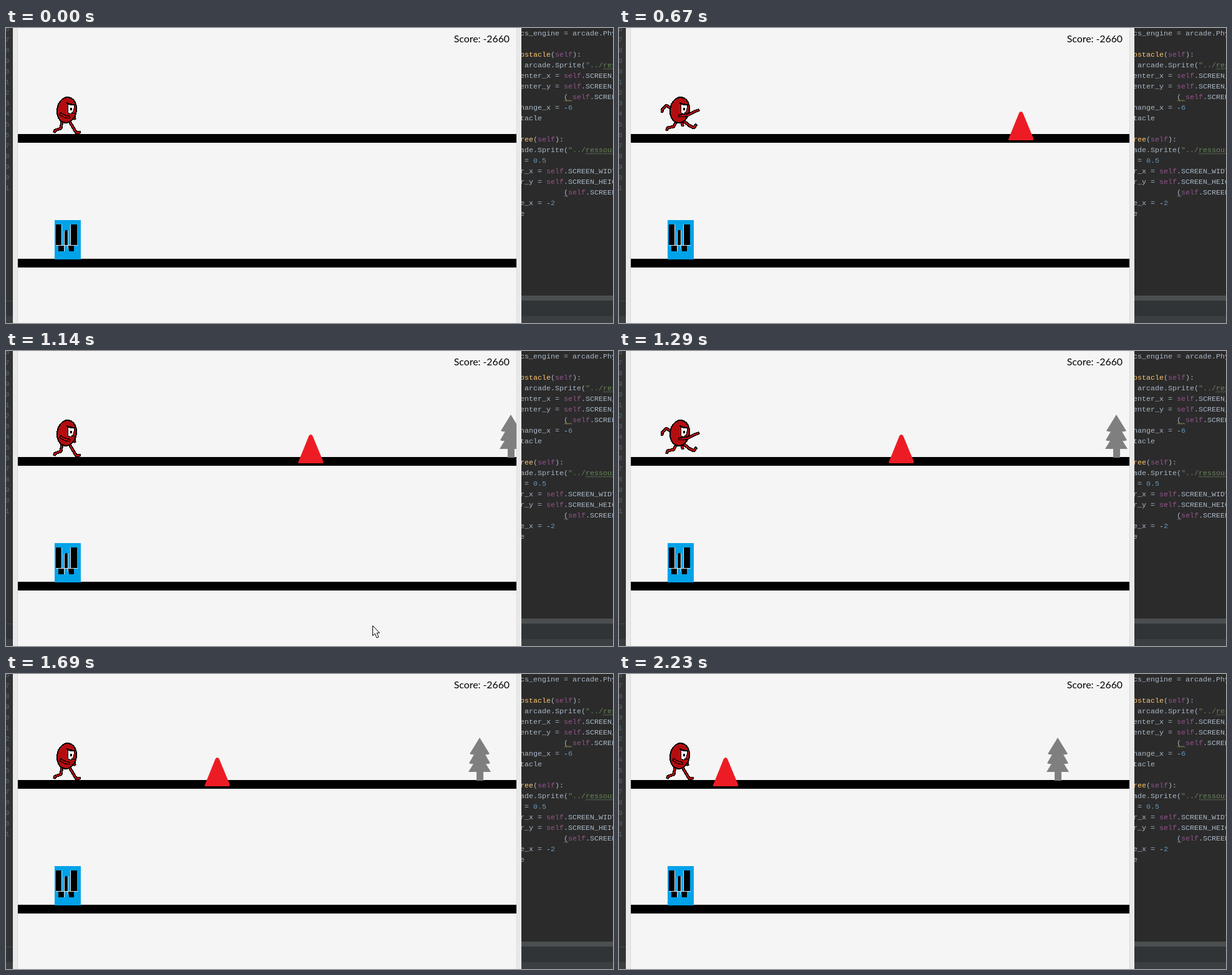
These frames come from a looping animation (974 by 473 pixels, 2.31 s). An HTML page:

```html
<!DOCTYPE html>
<html lang="en">
<head>
<meta charset="utf-8">
<title>Runner game</title>
<style>
html, body { margin: 0; width: 100%; height: 100%; overflow: hidden; background: #2b2b2b; }
svg { display: block; width: 100%; height: 100%; }
.code { font: 11.67px "Liberation Mono", "Courier New", monospace; fill: #a9b7c6; white-space: pre; }
.num { fill: #606366; }
.self { fill: #94558d; }
.str { fill: #6a8759; }
.fn { fill: #ffc66d; }
.lit { fill: #6897bb; }
.score { font: 15.8px Lato, Carlito, sans-serif; }
.pose { shape-rendering: crispEdges; }
.pose path { fill: none; stroke-linecap: round; stroke-linejoin: round; }
</style>
</head>
<body>
<svg viewBox="0 0 974 473" preserveAspectRatio="none">
  <defs><clipPath id="view"><path d="M19 0H819V473H19Z"/></clipPath></defs>

  <rect width="12" height="473" fill="#313335"/>
  <rect x="827" width="147" height="473" fill="#2b2b2b"/>
  <g id="code" class="code"></g>
  <g fill="none" stroke="#5d7350">
    <path id="wave1"/><path id="wave2"/>
    <path id="wave3" stroke="#a39a5c"/><path id="wave4" stroke="#8a8a8a"/>
  </g>
  <rect x="827" y="429" width="147" height="8" fill="#4c4f50"/>
  <rect y="437" width="974" height="25" fill="#313437"/>
  <rect y="437" width="11" height="1" fill="#46494b"/>
  <rect y="462" width="974" height="11" fill="#3c3f41"/>

  <rect x="11" width="816" height="473" fill="#e9e9e9"/>
  <path d="M18.5 0V473M819.5 0V473" stroke="#d8d8d8"/>
  <rect x="19" width="800" height="473" fill="#f5f5f5"/>
  <path d="M19 170H819V184H19ZM19 370H819V384H19Z"/>
  <text class="score" x="808" y="23.3" text-anchor="end">Score: -2660</text>

  <g shape-rendering="crispEdges">
    <rect x="78" y="308" width="42" height="63" fill="#00a2e8"/>
    <path fill="#dce8ee" d="M89 315H90V349H89ZM93 326H94V349H93ZM99 324H100V349H99ZM103 315H104V349H103ZM80 348H115V349H80ZM93 349H94V358H93ZM99 349H100V354H99Z"/>
    <path d="M80 315H89V348H80ZM94 326H95V324H99V348H94ZM104 315H114V348H104ZM84 349H93V358H84ZM100 349H109V358H101V354H100Z"/>
  </g>

  <g clip-path="url(#view)">
    <path id="tree" fill="#7f7f7f" d="M0 102L16 128Q12 130 9 129L17 143Q13 145 10 144L18 157H6V171H-5V157H-18L-10 144Q-13 145 -17 143L-9 129Q-12 130 -16 128Z"/>
    <path id="cone" fill="#ed1c24" d="M-20 178L-3 136Q0 132 3 136L20 177Q21 180 18 180H-18Q-21 180 -20 178Z"/>
    <g id="runner"></g>
    <path id="cursor" fill="#fff" stroke="#000" d="M.5 .5V16.5L4 13L7 20L10 18.5L7 12H11.5Z"/>
  </g>
</svg>
<script>
const $ = id => document.getElementById(id);
const LOOP = 2310;
const SHOTS = [0, 60, 140, 220, 290, 370, 450, 520, 600, 680, 760, 830, 910, 990, 1040,
  1140, 1220, 1290, 1370, 1450, 1520, 1590, 1690, 1760, 1840, 1910, 1990, 2070, 2140, 2230];
// [ms, game ticks]
const TICKS = [[0, -22], [370, 0], [910, 28], [1290, 44], [1690, 63], [1990, 78], [2230, 91]];
const MOUSE = [[910, 197], [1040, 320], [1140, 440]];

// Code lines: [y, text], where {class|text} colours a part.
const LINES = [
  [8, 'cs_engine = arcade.Physics'],
  [42, '{fn|bstacle}({self|self}):'],
  [59, ' arcade.Sprite({str|"../ress}'],
  [76, 'enter_x = {self|self}.SCREEN_W'],
  [93, 'enter_y = {self|self}.SCREEN_H'],
  [110, '          ( {self|self}.SCREEN'],
  [127, 'hange_x = -{lit|6}'],
  [144, 'tacle'],
  [178, '{fn|ree}({self|self}):'],
  [195, 'ade.Sprite({str|"../ressour}'],
  [212, ' = {lit|0.5}'],
  [229, 'r_x = {self|self}.SCREEN_WIDTH'],
  [246, 'r_y = {self|self}.SCREEN_HEIGH'],
  [263, '          ({self|self}.SCREEN_'],
  [280, 'e_x = -{lit|2}'],
  [297, 'e']
];
const paint = s => s.replace(/\{(\w+)\|([^}]*)\}/g, '<tspan class="$1">$2</tspan>');
let code = LINES.map(([y, s]) => `<text x="825" y="${y + 4}" xml:space="preserve">${paint(s)}</text>`).join('');
for (let i = 0; i < 16; i++)
  code += `<text class="num" x="-1.5" y="${5 + 17 * i}">${(6 + i) % 10}</text>`;
$('code').innerHTML = code;

function wave(id, x, y, end) {
  let d = `M${x} ${y}`;
  for (let i = 1; x + 2 * i <= end; i++) d += `L${x + 2 * i} ${y - 2 * (i % 2)}`;
  $(id).setAttribute('d', d);
}
wave('wave1', 958, 66.5, 976);
wave('wave2', 930, 202.5, 976);
wave('wave3', 896, 117.5, 908);
wave('wave4', 896, 270.5, 902);

const RED = '#b40d0f';
const limb = d => `<path d="${d}" stroke="#000" stroke-width="5"/><path d="${d}" stroke="${RED}" stroke-width="2.4"/>`;
const body = `<ellipse cx="97.5" cy="131.5" rx="15.5" ry="20.5" transform="rotate(9 97.5 131.5)" fill="${RED}" stroke="#000" stroke-width="2"/>
  <path d="M99 122Q104 120 109 124Q110 131 106 137Q101 139 99 134Z" style="fill:#fff;stroke:#000"/>
  <path d="M98 120L103 123L110 123" stroke="#000" stroke-width="2.4"/>
  <rect x="103" y="128" width="3" height="4"/>
  <path d="M106 136L111 137" stroke="#000" stroke-width="1.5"/>`;
const pose = (back, front) => `<g class="pose">${back.map(limb).join('')}${body}${front.map(limb).join('')}</g>`;

$('runner').innerHTML =
  pose(['M90 149L88 161L79 164L78 166', 'M102 150L108 160L113 168L118 167', 'M108 140L110 145'],
       ['M88 138L95 142L101 143']) +
  pose(['M84 129L75 133L73 134M83 127L76 124L73 133', 'M94 149L97 158L89 165L85 168', 'M103 150L108 158L105 168L109 169'],
       ['M90 137L103 145L115 139L120 128']) +
  pose(['M84 129L76 124L69 131L69 134', 'M92 149L88 158L78 160L77 163', 'M104 149L112 156L120 160L123 156', 'M101 152L102 156'],
       ['M97 141L110 140L121 134L127 132']);
const [push, stride, leap] = $('runner').children;
const cycle = [push, leap, stride];

function lerp(keys, t) {
  let i = 1;
  while (i < keys.length - 1 && t > keys[i][0]) i++;
  const [t0, v0] = keys[i - 1], [t1, v1] = keys[i];
  return v0 + (v1 - v0) * (t - t0) / (t1 - t0);
}
const show = (el, on) => el.setAttribute('display', on ? 'inline' : 'none');
const move = (el, x, y = 0) => el.setAttribute('transform', `translate(${x} ${y})`);

function draw(ms) {
  const t = SHOTS.filter(s => s <= ms).pop();
  const tick = Math.round(lerp(TICKS, t));
  move($('cone'), 717 - 6 * tick);
  move($('tree'), 798 - 2 * (tick - 44));
  // The three poses change every ten ticks.
  const step = Math.floor((tick + 31) % 30 / 10);
  cycle.forEach((el, i) => show(el, i === step));
  show($('cursor'), t >= 910 && t <= 1140);
  move($('cursor'), 588, Math.round(lerp(MOUSE, t)));
}

const start = performance.now();
function loop() {
  draw((performance.now() - start) % LOOP);
  requestAnimationFrame(loop);
}
loop();
</script>
</body>
</html>
```
